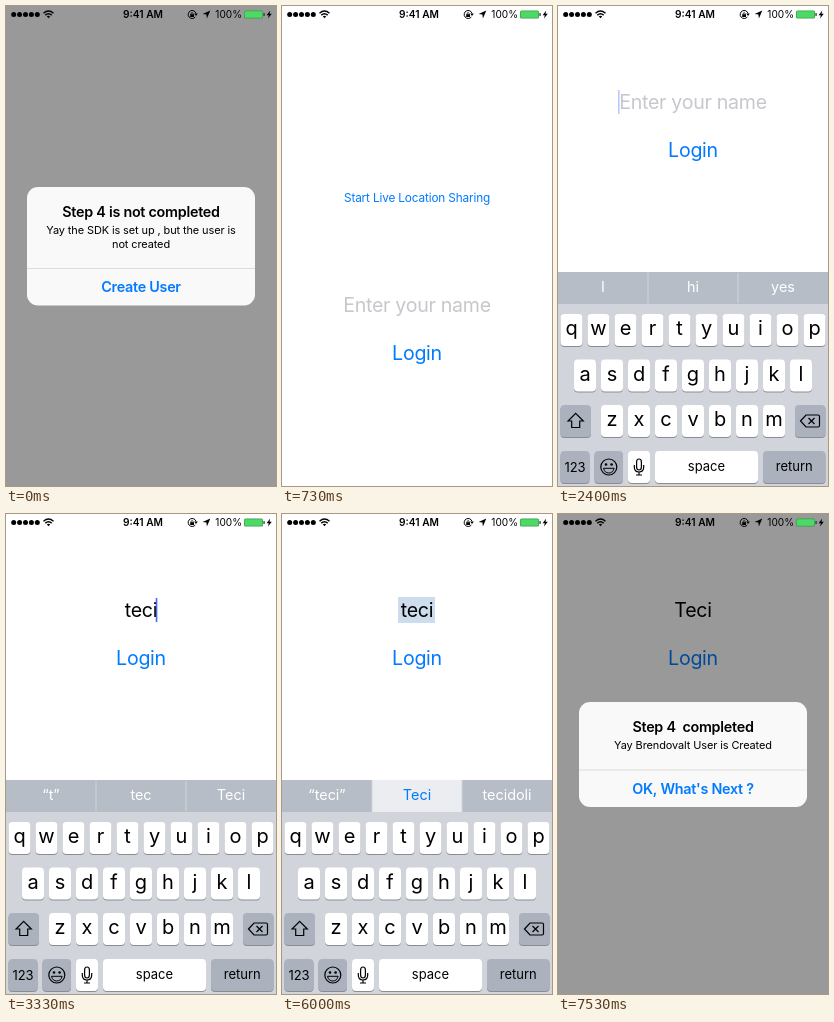
Recreate the animation shown at these times as an HTML page with a canvas. Size 270x480 px, loop 7.99 s.

```html
<!DOCTYPE html>
<html lang="en">
<head>
<meta charset="utf-8">
<title>Login</title>
<style>
html, body { margin: 0; width: 100%; height: 100%; overflow: hidden; background: #fff; }
canvas { display: block; }
</style>
</head>
<body>
<canvas id="stage" width="270" height="480"></canvas>
<script>
const ctx = document.getElementById('stage').getContext('2d');
const LOOP = 7990, STEP = 200 / 3;
const BLUE = '#007aff';
const clamp = v => Math.max(0, Math.min(1, v));
const easeOut = v => 1 - (1 - clamp(v)) ** 3;
const smooth = v => (v = clamp(v)) * v * (3 - 2 * v);

// Alternating times at which the caret fades in and out
const BLINKS = [1200, 1865, 2395, 3795, 4262, 4795, 5262, 5795, 6262, 6795];
const PRESSES = [['t', 2730, 2860], ['e', 2930, 3060], ['c', 3060, 3190], ['i', 3190, 3325]];
const NAME = 'teci';
const ROWS = [['qwertyuiop', 13.5, 308], ['asdfghjkl', 27, 353.5], ['zxcvbnm', 54, 399]];

function text(str, x, y, size, color, weight = 400, spacing = 0) {
  ctx.font = `${weight} ${size}px Inter, Roboto, sans-serif`;
  ctx.letterSpacing = spacing + 'px';
  ctx.textAlign = 'center';
  ctx.fillStyle = color;
  ctx.fillText(str, x, y);
  return ctx.measureText(str).width;
}

function rect(x, y, w, h, color) {
  ctx.fillStyle = color;
  ctx.fillRect(x, y, w, h);
}

function round(x, y, w, h, r, color) {
  ctx.beginPath();
  ctx.roundRect(x, y, w, h, r);
  ctx.fillStyle = color;
  ctx.fill();
}

function circle(x, y, r, color) {
  ctx.beginPath();
  ctx.arc(x, y, r, 0, 7);
  ctx.fillStyle = color;
  ctx.fill();
}

function line(d, width = 1.2, color = '#000') {
  ctx.strokeStyle = color;
  ctx.lineWidth = width;
  ctx.stroke(new Path2D(d));
}

function shape(d, color = '#000') {
  ctx.fillStyle = color;
  ctx.fill(new Path2D(d));
}

function statusBar() {
  for (let i = 0; i < 5; i++) circle(7.7 + i * 5.9, 8.6, 2.5, '#000');
  line('M37.5 7.2Q42.5 2.8 47.5 7.2M39.3 9.1Q42.5 6.3 45.7 9.1', 1.4);
  shape('M42.5 12.2L40.8 10.4Q42.5 9.1 44.2 10.4Z');
  text('9:41 AM', 137, 12, 10.2, '#000', 600);
  line('M189.3 11A4 4 0 1 1 190 7.3', 1);
  shape('M188.2 7.6H191.8L190 10Z');
  rect(184.2, 8.2, 3.8, 2.8, '#000');
  line('M185 8.3V7.4Q186.1 5.8 187.2 7.4V8.3', .8);
  shape('M204.3 4.6L200.9 12.4L200.4 8.6L196.6 8.1Z');
  text('100%', 222.7, 12, 10.1, '#000');
  round(238, 4.5, 19, 8, 1.6, '#3a9c4a');
  round(238.7, 5.2, 17.6, 6.6, 1, '#4cd964');
  round(257.4, 7, 1.3, 3, .6, '#333');
  shape('M264.2 4.6L260.6 9.2H262.8L262 12.6L265.8 7.8H263.5Z');
}

function key(x, y, w, color = '#fff') {
  round(x, y + 1, w, 32, 4, '#898c92');
  round(x, y, w, 32, 4, color);
}

function suggestions(t) {
  const done = t >= 3530;
  const words = done ? ['“' + NAME + '”', 'Teci', 'tecidoli']
    : t >= 2930 ? ['“t”', 'tec', 'Teci'] : ['I', 'hi', 'yes'];
  rect(0, 266, 270, 32, '#b6bdc6');
  if (done) rect(90, 266, 90, 32, '#ebedf0');
  rect(89.5, 267, 1, 30, '#d0d5da');
  rect(179.5, 267, 1, 30, '#d0d5da');
  words.forEach((w, i) => text(w, 45 + i * 90, 286, 14.4, done && i == 1 ? BLUE : '#fff'));
}

function popup(char) {
  const row = ROWS.find(r => r[0].includes(char));
  const x = row[1] + 27 * row[0].indexOf(char), y = row[2];
  ctx.save();
  ctx.translate(x, y);
  ctx.shadowColor = 'rgba(0,0,0,.4)';
  ctx.shadowBlur = 2;
  shape('M-16 -46H16Q23 -46 23 -39V-14C23 -4 11 -5 11 5V28Q11 32 7 32H-7Q-11 32 -11 28V5C-11 -5 -23 -4 -23 -14V-39Q-23 -46 -16 -46Z', '#fcfcfc');
  ctx.restore();
  text(char, x, y - 15, 29, '#000');
}

function keyboard(t, drop) {
  const grey = '#abb2bd';
  ctx.save();
  ctx.translate(0, drop);
  rect(0, 266, 270, 214, '#d1d5db');
  suggestions(t);
  for (const [chars, x0, y] of ROWS) {
    [...chars].forEach((c, i) => {
      const x = x0 + i * 27;
      key(x - 11, y, 22);
      text(c, x, y + 21.3, 20, '#000');
    });
  }
  key(2.5, 399, 30.5, grey);
  line('M17.7 407.3L25.3 415H21.7V421.5H13.7V415H10.1Z');
  key(237, 399, 30.5, grey);
  line('M242.5 415L248 409H260Q261.5 409 261.5 410.5V419.5Q261.5 421 260 421H248Z');
  line('M250.5 412L256.5 418M256.5 412L250.5 418');

  key(2.5, 445, 29, grey);
  text('123', 17, 466, 13, '#000');
  key(36.5, 445, 28.5, grey);
  line('M58.8 461A8 8 0 1 1 42.8 461A8 8 0 1 1 58.8 461Z');
  circle(48, 458.5, 1.3, '#000');
  circle(53.6, 458.5, 1.3, '#000');
  line('M45.5 462.3H56.1Q55 467 50.8 467Q46.6 467 45.5 462.3Z', 1);
  key(70, 445, 22);
  line('M78.6 456Q78.6 453 81 453Q83.4 453 83.4 456V461Q83.4 464 81 464Q78.6 464 78.6 461ZM76.3 459V461Q76.3 466 81 466Q85.7 466 85.7 461V459M81 466V469M78 469H84');
  key(97, 445, 103);
  text('space', 148.5, 465.3, 13, '#000');
  key(205, 445, 62.5, grey);
  text('return', 236.2, 465.3, 13, '#000');
  const press = PRESSES.find(p => t >= p[1] && t < p[2]);
  if (press) popup(press[0]);
  ctx.restore();
}

function caret(x, t) {
  const i = BLINKS.findLastIndex(b => b <= t);
  const f = clamp((t - BLINKS[i] + STEP) / 200);
  ctx.globalAlpha = i % 2 ? 1 - f : f;
  rect(x, 84, 1.6, 24, '#426bf2');
  ctx.globalAlpha = 1;
}

function form(t) {
  if (t < 730) return;
  const editing = t >= 1330 && t < 7070;
  const shift = t < 1330 ? 203 : 0;
  const typed = t >= 7070 ? 'Teci' : NAME.slice(0, PRESSES.filter(p => t >= p[2]).length);
  if (shift) text('Start Live Location Sharing', 135, 196, 11.8, BLUE, 400, -.15);
  if (t >= 3530 && editing) rect(116, 83, 37, 26, '#cddded');
  const width = text(typed || 'Enter your name', 135, 103 + shift, 19.6, typed ? '#000' : '#c7c7cd', 400, -.28);
  text('Login', 135, 151 + shift, 19.6, BLUE, 400, -.28);
  if (editing) caret(typed ? 134.5 + width / 2 - 1 : 60, t);
}

function alertBox(top, height, title, lines, button, alpha, scale) {
  rect(0, 0, 270, 480, `rgba(0,0,0,${.4 * alpha})`);
  ctx.save();
  ctx.globalAlpha = alpha;
  ctx.translate(135, 240);
  ctx.scale(scale, scale);
  ctx.translate(-135, -240);
  round(21, top, 228, height, 11, '#f9f9f9');
  text(title, 135, top + 30, 14.35, '#000', 600, -.26);
  lines.forEach((s, i) => text(s, 135, top + 47 + i * 13.7, 10.97, '#000', 400, -.11));
  rect(21, top + height - 37.5, 228, 1, '#dcdcde');
  text(button, 135, top + height - 13.3, 14.35, BLUE, 600, -.26);
  ctx.restore();
}

function draw(t) {
  rect(0, 0, 270, 480, '#fff');
  form(t);
  if (t >= 1330 && t < 7530) {
    const up = easeOut((t - 1304) / 400);
    const down = smooth((t - 7020) / 400);
    keyboard(t, 214 * (1 - up + down));
  }
  if (t < 470) {
    alertBox(181, 118.5, 'Step 4 is not completed',
      ['Yay the SDK is set up , but the user is', 'not created'],
      'Create User', 1 - smooth((t - 70) / 390), 1);
  }
  if (t >= 7130) {
    const p = easeOut((t - 7080) / 430);
    alertBox(188, 105, 'Step 4  completed', ['Yay Brendovalt User is Created'],
      "OK, What's Next ?", p, 1.18 - .18 * p);
  }
  statusBar();
}

// The screen updates fifteen times a second
function tick(now) {
  draw(Math.floor((now % LOOP + 6) / STEP) * STEP);
  requestAnimationFrame(tick);
}
requestAnimationFrame(tick);
</script>
</body>
</html>
```
